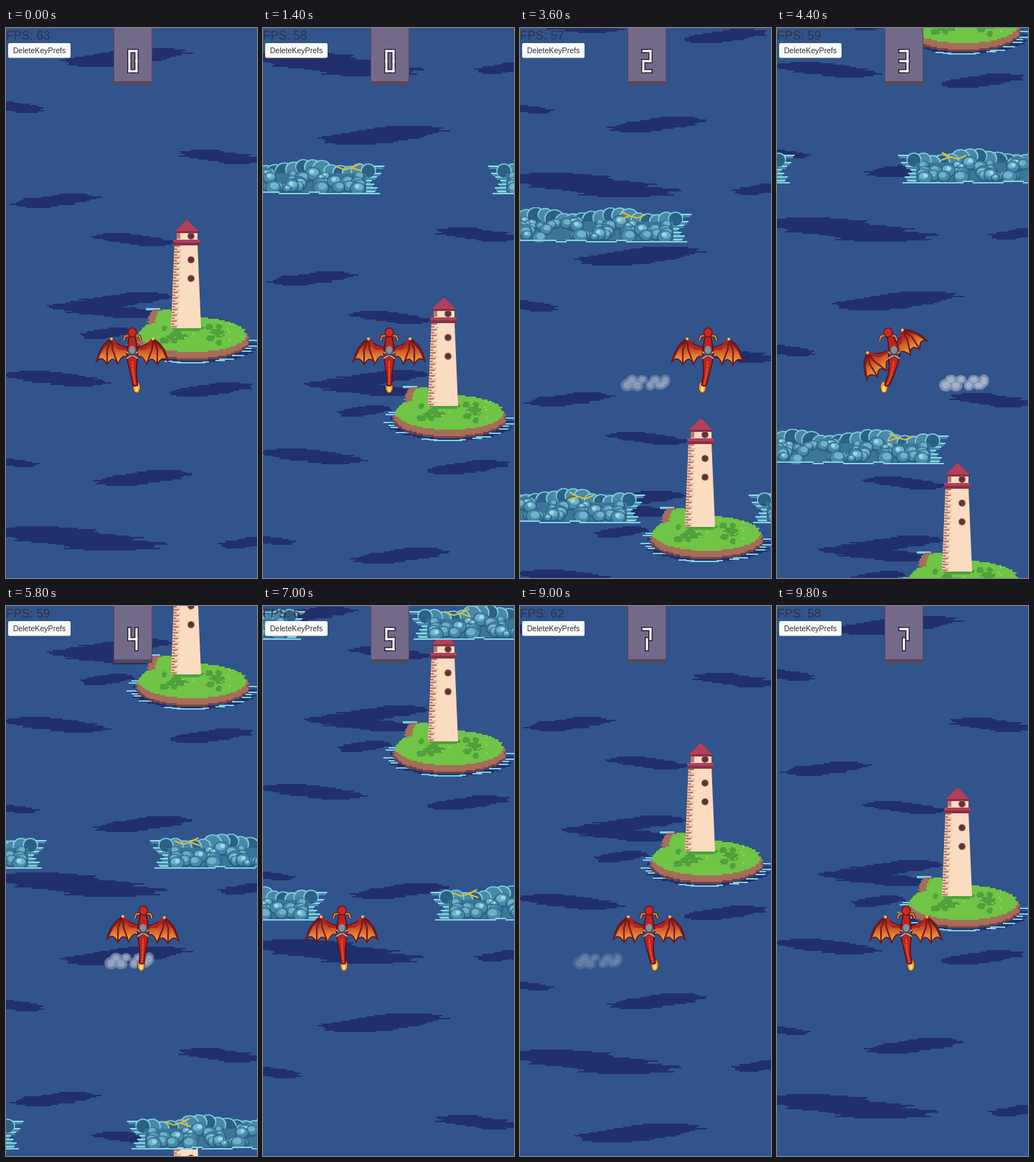
An HTML page with a canvas that plays this animation: 350x764 px, repeating every 9900 ms.

```html
<!DOCTYPE html>
<html lang="en">
<head>
<meta charset="utf-8">
<style>
  html, body { margin: 0; width: 100%; height: 100%; overflow: hidden; background: #31548c; }
  canvas { display: block; }
</style>
</head>
<body>
<canvas id="stage" width="350" height="764"></canvas>
<script>
const W = 350, H = 764, LOOP = 9900, STEP = 100;
const SEA_PERIOD = 767, SEA_SPEED = 76.8;
const WALL_SPEED = 385, WALL_SPACING = 390, GAP = 143;
const GAP_LEFT = [170, 175, 240, 25, 57, 90, 60];
// Dashes: start in seconds, sideways distance
const DASHES = [[3.2, 86], [4.18, -172], [5, 83], [5.45, 19], [5.9, -82], [8.5, 70]];
const DASH_TIME = 0.4, START_X = 176, DRAGON_Y = 455;
const SEGMENTS = ['abcdef', 'nmd', 'abged', 'abgcd', 'fgbc', 'afgcd', 'afgcde', 'abm'];
const stage = document.getElementById('stage').getContext('2d');

const clamp = (v, lo, hi) => Math.min(hi, Math.max(lo, v));

function seeded(seed) {
  return () => (seed = (seed * 16807) % 2147483647) / 2147483647;
}

function layer(w, h, paint) {
  const c = document.createElement('canvas');
  c.width = w; c.height = h;
  paint(c.getContext('2d'));
  return c;
}

function box(g, color, x, y, w, h) {
  g.fillStyle = color;
  g.fillRect(x, y, w, h);
}

function oval(g, color, x, y, rx, ry = rx) {
  g.fillStyle = color;
  g.beginPath();
  g.ellipse(x, y, rx, ry, 0, 0, 7);
  g.fill();
}

function line(g, color, width, points) {
  g.strokeStyle = color;
  g.lineWidth = width;
  g.beginPath();
  for (const p of points) g.lineTo(...p);
  g.stroke();
}

// Symmetric shape given by its half width at top and bottom
function taper(g, color, x, y0, half0, y1, half1) {
  g.fillStyle = color;
  g.beginPath();
  g.moveTo(x - half0, y0);
  g.lineTo(x + half0, y0);
  g.lineTo(x + half1, y1);
  g.lineTo(x - half1, y1);
  g.fill();
}

// Ellipse made of pixel rows with frayed ends
function blob(g, rnd, color, cx, cy, rx, ry, fray) {
  for (let y = -ry; y < ry; y += 2) {
    const half = rx * Math.sqrt(1 - ((y + 1) / ry) ** 2);
    const left = Math.round(cx - half * (1 - rnd() * fray));
    const right = Math.round(cx + half * (1 - rnd() * fray));
    box(g, color, left, Math.round(cy + y), right - left, 2);
  }
}

// Three overlapping slivers that drift sideways from row to row
function streak(g, rnd, cx, cy, len, lean) {
  for (let i = -1; i <= 1; i++) {
    const half = len * (0.36 - Math.abs(i) * 0.06);
    blob(g, rnd, '#21306d', cx - i * lean * len * 0.17, cy + i * len * 0.03, half, 3 + Math.round(len / 55), 0.35);
  }
}

function drawIsland(g, rnd) {
  const cx = 260;
  for (let a = -0.35; a < 3.6; a += 0.13) {
    const w = 8 + rnd() * 14;
    if (rnd() > 0.35) box(g, '#78cfe2', Math.round(cx + 82 * Math.cos(a) - w / 2), Math.round(436 + 28 * Math.sin(a)), w, 2);
  }
  box(g, '#78cfe2', 195, 389, 20, 3);
  blob(g, rnd, '#744347', cx, 436, 81, 26, 0.05);
  blob(g, rnd, '#a66d58', cx, 433, 80, 26, 0.05);
  blob(g, rnd, '#a66d58', 212, 405, 16, 14, 0.2);
  blob(g, rnd, '#70c446', 224, 404, 17, 13, 0.2);
  blob(g, rnd, '#70c446', cx, 426, 77, 24, 0.05);
  for (let i = 0; i < 14; i++) {
    const x = 200 + rnd() * 100, y = 412 + rnd() * 28;
    blob(g, rnd, '#4fa13d', x, y, 4 + rnd() * 9, 4, 0.5);
    box(g, '#a0dc62', x + 14, y - 5, 2, 2);
  }
}

function drawTower(g) {
  blob(g, seeded(3), '#4fa13d', 256, 417, 22, 4, 0.2);
  taper(g, '#fadcc1', 251, 299, 16, 417, 21);
  for (let row = 0; row < 29; row++) {
    const left = 235 - row * 0.17;
    box(g, '#b97a68', left, 302 + row * 4, row % 2 ? 4 : 8, 2);
    box(g, '#dba98f', left + 1, 304 + row * 4, row % 2 ? 9 : 5, 1);
  }
  box(g, '#fadcc1', 238, 282, 29, 13);
  box(g, '#b97a68', 238, 284, 5, 9);
  taper(g, '#86304a', 252, 266, 1, 285, 18);
  taper(g, '#b43f5c', 252, 267, 1, 282, 16);
  box(g, '#86304a', 234, 294, 36, 8);
  box(g, '#b43f5c', 233, 294, 37, 4);
  for (const y of [289, 322, 348]) {
    oval(g, '#a06459', 258, y, 5);
    oval(g, '#63303a', 258, y, 4);
  }
}

const sea = layer(W, SEA_PERIOD, g => {
  const rnd = seeded(77);
  box(g, '#31548c', 0, 0, W, SEA_PERIOD);
  [[168, 41, 210], [300, 179, 140], [68, 240, 140], [180, 294, 130], [160, 378, 170], [138, 392, 180], [140, 424, 90],
    [70, 487, 180], [285, 502, 140], [10, 604, 80], [190, 625, 165], [95, 709, 300], [335, 715, 90], [15, 110, 90]]
    .forEach(([x, y, len], i) => streak(g, rnd, x, y, len, i % 2 ? -1 : 1));
  blob(g, rnd, '#21306d', 262, 440, 92, 26, 0.2);
  drawIsland(g, rnd);
  drawTower(g);
});

// Rock wall whose ragged end is at the right edge
const wall = layer(400, 52, g => {
  const rnd = seeded(4242);
  for (let y = 9; y < 46; y += 5) {
    const end = 400 - rnd() * 18;
    box(g, '#4a89a8', 340, y, end - 342, 5);
    box(g, '#86dbe8', 372, y, end - 372, 2);
  }
  const stone = (x, y, r) => {
    oval(g, '#2d6085', x, y + 1, r + 1.5, r + 0.5);
    oval(g, '#4a89a8', x, y, r, r * 0.85);
    oval(g, '#6db3c8', x + r * 0.2, y - r * 0.2, r * 0.65, r * 0.5);
    if (rnd() > 0.6) oval(g, '#9cd9e4', x - r * 0.1, y - r * 0.3, r * 0.35, r * 0.3);
  };
  for (let x = 0; x < 378; x += 13) {
    const y = 14 + 5 * Math.sin(x / 17) + rnd() * 4, r = 9 + rnd() * 4;
    oval(g, '#80d2e1', x, y, r + 1.5, r + 0.5);
    oval(g, rnd() > 0.6 ? '#2d6085' : '#4a89a8', x, y + 1, r, r);
  }
  box(g, '#3d7798', 0, 20, 374, 26);
  for (let i = 0; i < 85; i++) stone(rnd() * 374, 18 + 22 * i / 85 + rnd() * 3, 5 + rnd() * 5);
  for (let x = 0; x < 380; x += 14) box(g, '#80d2e1', x, 45 + Math.round(rnd()) * 2, 15, 2);
  g.clearRect(0, 49, 400, 3);
});

const wallTop = (k, t) => 182 + WALL_SPEED * (t - 1.4) - WALL_SPACING * k;

function drawWall(g, k, t) {
  const gap = GAP_LEFT[k], y = Math.round(wallTop(k, t));
  if (y < -60 || y > H) return;
  g.drawImage(wall, gap - 400, y);
  g.save();
  g.scale(-1, 1);
  g.drawImage(wall, -(gap + GAP) - 400, y);
  g.restore();
  const side = k < 3 ? gap - 70 : gap + GAP + 60;
  g.save();
  g.translate(side + 20 * Math.sin(k + t), y + 14);
  g.scale(Math.floor(t * 5) % 2 ? 1 : -1, 1);
  line(g, '#dfbe35', 2, [[-18, -4], [-6, 1], [4, -2], [18, 3]]);
  line(g, '#dfbe35', 2, [[4, -2], [16, -8]]);
  g.restore();
}

function dragonX(t) {
  return DASHES.reduce((x, [start, dx]) => {
    const u = clamp((t - start) / DASH_TIME, 0, 1);
    return x + dx * u * u * (3 - 2 * u);
  }, START_X);
}

function drawWing(g, side, lift) {
  const raise = (x, y) => [x, y - lift * 28 * (x / 50) ** 1.5];
  const tips = [0, 1, 2].map(i => [50 - 15 * i, 9 + 4.5 * Math.sin(i * 1.2)]);
  const wrist = raise(29, -23);
  const fire = g.createLinearGradient(0, -20, 0, 13 - lift * 10);
  fire.addColorStop(0, '#8d1a1d');
  fire.addColorStop(0.5, '#d9662a');
  fire.addColorStop(1, '#f2c045');
  g.save();
  g.scale(side, 1);
  g.beginPath();
  g.moveTo(5, -11);
  g.quadraticCurveTo(18, -12, ...wrist);
  g.quadraticCurveTo(...raise(45, -15), ...raise(...tips[0]));
  [...tips.slice(1), [5, 7]].forEach(([x, y]) => g.quadraticCurveTo(...raise(x + 7, y - 14), ...raise(x, y)));
  g.fillStyle = fire;
  g.fill();
  g.strokeStyle = '#58141f';
  g.lineWidth = 1.5;
  g.stroke();
  for (const [x, y] of tips) line(g, '#7c161d', 2.2, [wrist, raise((x + 29) / 2 + 3, -8), raise(x, y)]);
  line(g, '#b81f1d', 3.5, [[5, -9], raise(18, -10), wrist]);
  oval(g, '#f0c35a', ...wrist, 2);
  g.restore();
}

function drawDragon(g, t) {
  const speed = (dragonX(t + 0.01) - dragonX(t - 0.01)) / 0.02;
  const tilt = clamp(speed * 0.0009, -0.6, 0.6);
  const sway = -8 * Math.sin((t - 1.4) * Math.PI / 5) + tilt * 11;
  const lift = Math.max(0, Math.cos((t - 8.2) * 2 * Math.PI)) ** 3;
  const bend = y => y < 0 ? tilt * 14 * (y / 32) ** 2 : sway * (y / 48) ** 2;
  const girth = y => 3 + 4.5 * Math.exp(-(((y + 2) / 20) ** 2));
  g.save();
  g.translate(dragonX(t), DRAGON_Y);
  g.save();
  g.rotate(tilt);
  drawWing(g, -1, lift);
  drawWing(g, 1, lift);
  g.restore();

  oval(g, '#7c3a20', sway, 44, 5.5, 8.5);
  oval(g, '#e9a632', sway, 44, 4.5, 7.5);
  oval(g, '#f8df7a', sway, 46, 2, 4);
  for (const [color, grow] of [['#571320', 1], ['#c4231d', -0.5]]) {
    for (let y = -30; y <= 40; y++) oval(g, color, bend(y), y, girth(y) + grow, 2 + grow);
  }
  for (let y = 8; y < 40; y += 3) box(g, '#ef6327', bend(y) - 1, y, 2, 2);

  const hx = bend(-32);
  for (const s of [-1, 1]) {
    const horn = [[hx + s * 3, -28], [hx + s * 10, -27], [hx + s * 12, -21]];
    line(g, '#571320', 4, horn);
    line(g, '#e2912f', 2, horn);
  }
  oval(g, '#571320', hx, -32, 6.5, 7);
  oval(g, '#cf2a20', hx, -32, 5.2, 5.8);

  // Rider with crossed blades
  for (const [color, width] of [['#3d3a46', 3.5], ['#b5b5ba', 1.7]]) {
    for (const s of [-1, 1]) line(g, color, width, [[-8 * s, 4], [8 * s, -5]]);
  }
  oval(g, '#4b4954', 0, -7, 6, 7);
  oval(g, '#8c8d95', 0, -8, 4.5, 5.5);
  g.restore();
}

function drawPuff(g, start, t) {
  const age = t - start;
  if (age < 0 || age > 0.6) return;
  const x = dragonX(start);
  g.save();
  g.globalAlpha = Math.min(0.9, (0.6 - age) * 2.8);
  for (const [color, size] of [['#8396b6', 1], ['#a9b4c8', 0.6]]) {
    const rnd = seeded(29);
    for (let i = 0; i < 8; i++) {
      const px = x + (i - 3.5) * 7 + (i < 4 ? -2 : 2);
      oval(g, color, px, 492 + (i % 2 ? -4 : 4) + rnd() * 2, (7 + rnd() * 3) * size, (6 + rnd() * 3) * size);
    }
  }
  g.restore();
}

function drawDigit(g, n) {
  const l = 172, c = 177, r = 182, top = 32, mid = 46, low = 60;
  const ends = {
    a: [l, top, r, top], b: [r, top, r, mid], c: [r, mid, r, low], d: [l, low, r, low], e: [l, mid, l, low],
    f: [l, top, l, mid], g: [l, mid, r, mid], n: [c, top, c, mid], m: [c, mid, c, low]
  };
  g.lineCap = 'square';
  for (const [color, width] of [['#25202d', 6], ['#fff', 3]]) {
    for (const s of SEGMENTS[n]) {
      const [x0, y0, x1, y1] = ends[s];
      line(g, color, width, [[x0, y0], [x1, y1]]);
    }
  }
  g.lineCap = 'butt';
}

function drawHud(g, t) {
  box(g, '#574858', 150, 0, 54, 79);
  box(g, '#75698a', 151, 0, 52, 74);
  drawDigit(g, GAP_LEFT.filter((_, k) => wallTop(k, t) > 445).length);

  g.fillStyle = '#fafafa';
  g.beginPath();
  g.roundRect(3, 21, 87, 20.5, 2);
  g.fill();
  g.fillStyle = '#303030';
  g.textAlign = 'center';
  g.font = '10.6px "Liberation Sans", Arial, sans-serif';
  g.fillText('DeleteKeyPrefs', 46.5, 34.5);
  g.textAlign = 'left';
  g.font = '17px "Liberation Sans", Arial, sans-serif';
  g.fillStyle = '#2f3440';
  g.fillText('FPS: ' + Math.round(60 + 3 * Math.cos(t * 6.17)), 0, 15.5);
}

function draw(t) {
  const y = Math.round(SEA_SPEED * t) % SEA_PERIOD;
  stage.drawImage(sea, 0, y);
  stage.drawImage(sea, 0, y - SEA_PERIOD);
  GAP_LEFT.forEach((_, k) => drawWall(stage, k, t));
  DASHES.forEach(([start]) => drawPuff(stage, start, t));
  drawDragon(stage, t);
  drawHud(stage, t);
}

const start = performance.now();
function tick() {
  const ms = (performance.now() - start) % LOOP;
  draw(Math.floor(ms / STEP) * STEP / 1000);
  requestAnimationFrame(tick);
}
tick();
</script>
</body>
</html>
```
